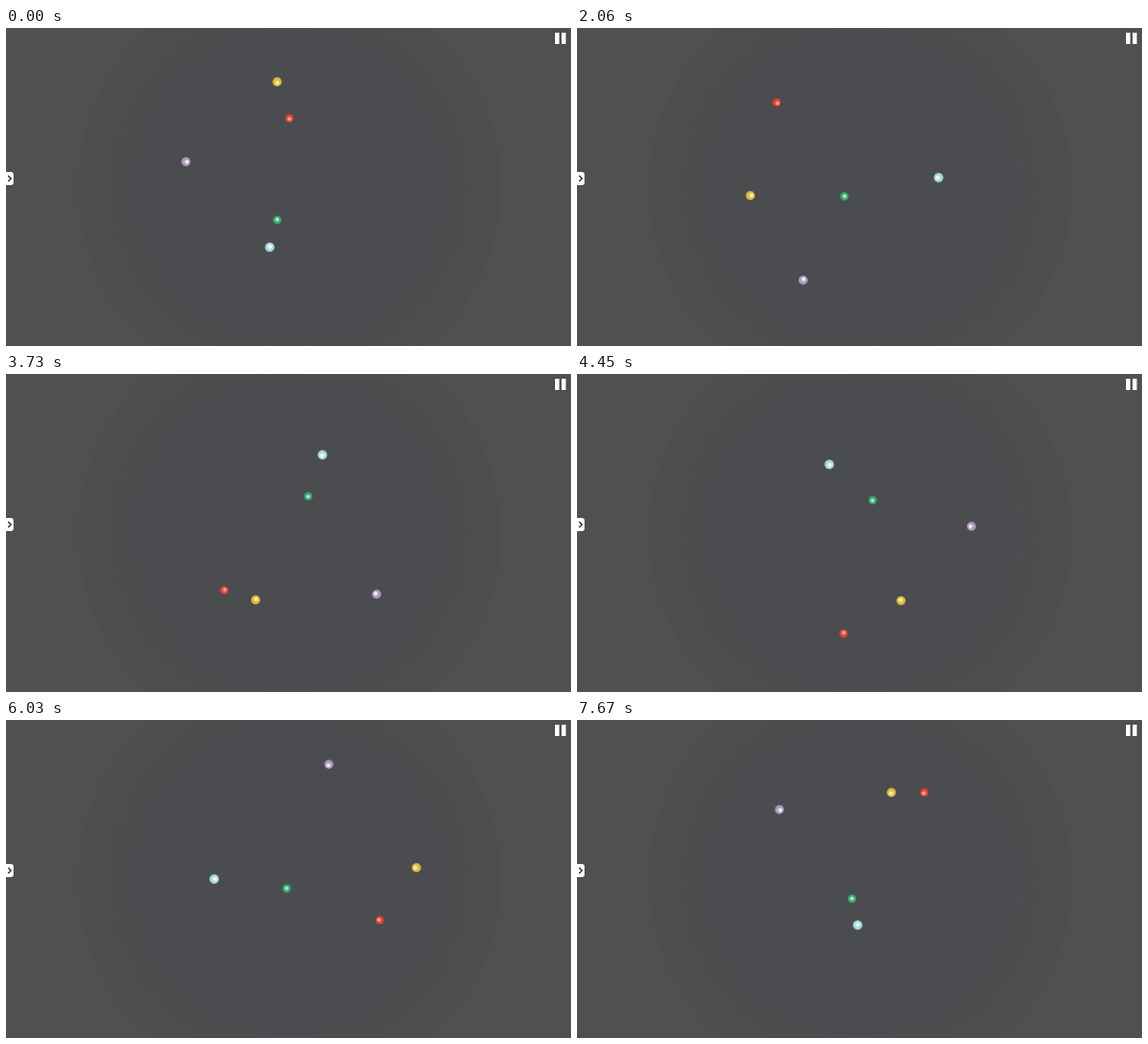
An HTML page with a canvas that plays this animation: 600x338 px, repeating every 7700 ms.

```html
<!DOCTYPE html>
<html lang="en">
<head>
<meta charset="utf-8">
<title>Orbiting balls</title>
<style>
html, body { margin: 0; width: 100%; height: 100%; overflow: hidden; background: #4f5050; }
canvas { display: block; }
</style>
</head>
<body>
<canvas width="600" height="338"></canvas>
<script>
const ctx = document.querySelector('canvas').getContext('2d');
const LOOP = 7700;
const LIGHT = [301, 167];

// Waypoints of every path share these times, in seconds
const times = [0, 1.03, 2.06, 3, 3.72, 4.45, 5.45, 6.03, 6.61, 7.14, 7.67];
const balls = [
  { r: 5.1, glow: '#fff3a4', base: '#dcbc46', edge: '#8d7936',
    x: [288, 219, 184, 201, 264, 344, 423, 436, 423, 385, 334],
    y: [57, 108, 178, 217, 240, 241, 184, 157, 133, 104, 77] },
  { r: 4.9, glow: '#ff9f8c', base: '#d24a36', edge: '#80382f',
    x: [301, 279, 212, 200, 231, 283, 365, 397, 410, 399, 369],
    y: [96, 54, 79, 157, 229, 276, 259, 213, 155, 112, 77] },
  { r: 5.1, glow: '#f3ebfa', base: '#ad9abd', edge: '#716879',
    x: [191, 193, 240, 336, 393, 419, 386, 343, 295, 253, 215],
    y: [142, 201, 268, 283, 235, 162, 71, 47, 53, 69, 95] },
  { r: 4.9, glow: '#a9edcb', base: '#3ca572', edge: '#2f6850',
    x: [288, 276, 284, 320, 321, 314, 311, 298, 286, 286, 292],
    y: [204, 204, 179, 141, 130, 134, 153, 179, 201, 202, 190] },
  { r: 5.3, glow: '#f4ffff', base: '#a9d8de', edge: '#6c8e94',
    x: [280, 328, 384, 388, 337, 268, 217, 221, 242, 269, 298],
    y: [233, 209, 159, 113, 86, 96, 135, 169, 200, 212, 218] }
];

const last = times.length - 1;
const slope = (v, i) => (v[i + 1] - v[i]) / (times[i + 1] - times[i]);

function tangent(v, i) {
  if (i === 0) return 2 * slope(v, 0) - tangent(v, 1);
  if (i === last) return 2 * slope(v, last - 1) - tangent(v, last - 1);
  const before = times[i] - times[i - 1];
  const after = times[i + 1] - times[i];
  return (slope(v, i - 1) * after + slope(v, i) * before) / (before + after);
}

// Cubic Hermite curve through the waypoints
function along(v, t) {
  let i = 0;
  while (i < last - 1 && t >= times[i + 1]) i++;
  const h = times[i + 1] - times[i];
  const u = (t - times[i]) / h;
  const w = 1 - u;
  return w * w * (1 + 2 * u) * v[i] + u * u * (3 - 2 * u) * v[i + 1]
    + h * u * w * (w * tangent(v, i) - u * tangent(v, i + 1));
}

function radial(x0, y0, r0, x1, y1, r1, stops) {
  const g = ctx.createRadialGradient(x0, y0, r0, x1, y1, r1);
  for (const [at, color] of stops) g.addColorStop(at, color);
  return g;
}

const backdrop = radial(301, 169, 0, 301, 169, 345, [
  [0, '#4b4c50'], [0.485, '#4b4c4f'], [0.495, '#4e4d4e'],
  [0.645, '#4f4d4d'], [0.655, '#4f5050'], [1, '#505050']
]);

function drawBall(ball, t) {
  const x = along(ball.x, t);
  const y = along(ball.y, t);
  const lx = x + (LIGHT[0] - x) * 0.017;
  const ly = y + (LIGHT[1] - y) * 0.017;
  ctx.fillStyle = radial(lx, ly, 0, x, y, ball.r, [
    [0, ball.glow], [0.25, ball.glow], [0.55, ball.base], [0.78, ball.base], [1, ball.edge]
  ]);
  ctx.beginPath();
  ctx.arc(x, y, ball.r, 0, 2 * Math.PI);
  ctx.fill();
}

function drawControls() {
  ctx.fillStyle = '#fff';
  ctx.fillRect(583, 5, 4.5, 12);
  ctx.fillRect(590, 5, 4.5, 12);
  ctx.beginPath();
  ctx.roundRect(-6, 153, 14, 14, 3);
  ctx.fill();
  ctx.strokeStyle = '#222';
  ctx.lineWidth = 1.3;
  ctx.beginPath();
  ctx.moveTo(2.3, 157);
  ctx.lineTo(5.3, 160);
  ctx.lineTo(2.3, 163);
  ctx.stroke();
}

function draw() {
  const t = performance.now() % LOOP / 1000;
  ctx.fillStyle = backdrop;
  ctx.fillRect(0, 0, 600, 338);
  for (const ball of balls) drawBall(ball, t);
  drawControls();
  requestAnimationFrame(draw);
}
draw();
</script>
</body>
</html>
```
